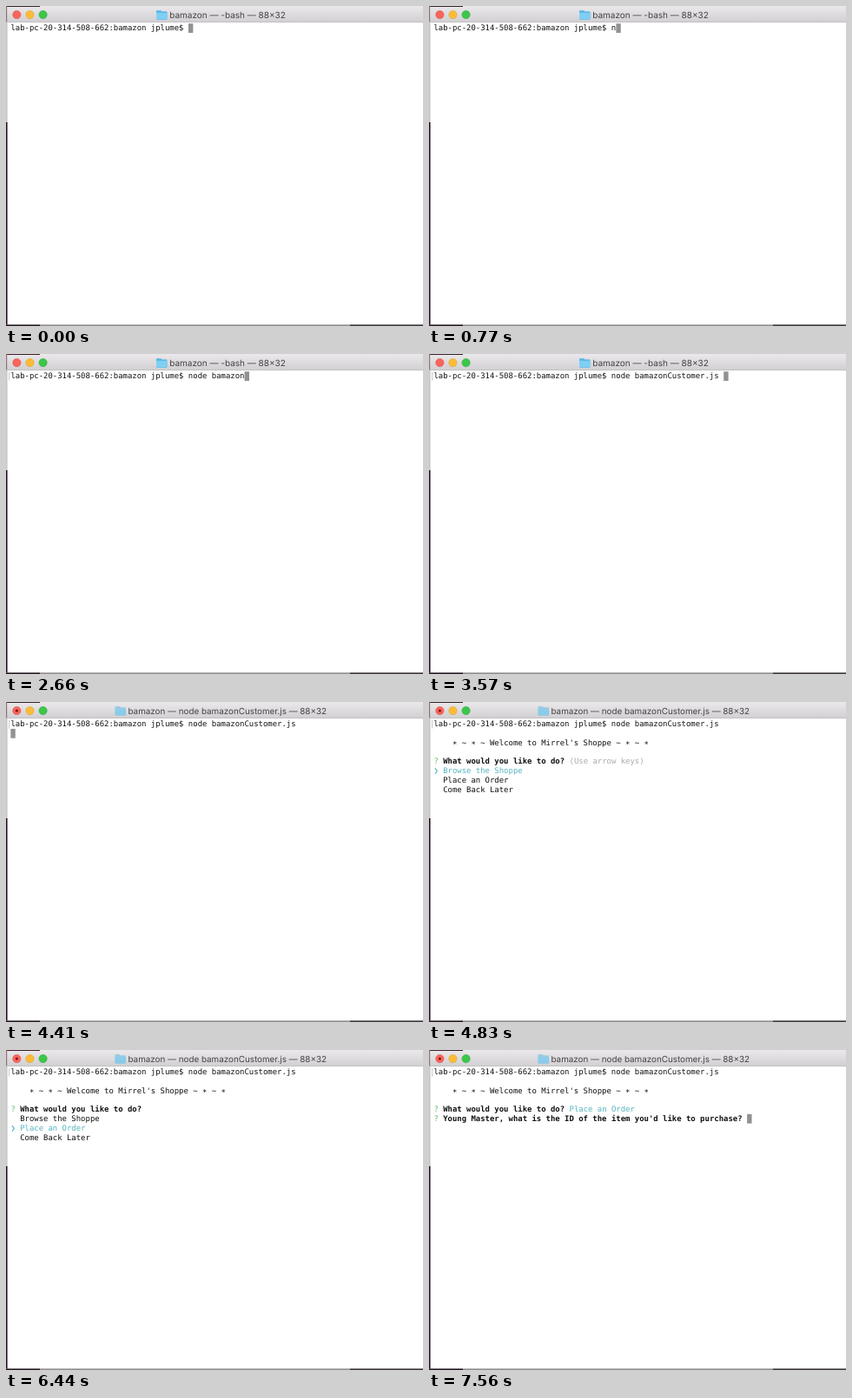
Recreate the animation shown at these times as an HTML page with a canvas. Size 480 px wide and 369 px high, loop 8 s.

```html
<!DOCTYPE html>
<html lang="en">
<head>
<meta charset="utf-8">
<title>Terminal session</title>
<style>
  html, body { margin: 0; width: 100%; height: 100%; overflow: hidden; background: #fff; }
  canvas { display: block; width: 480px; height: 369px; }
</style>
</head>
<body>
<canvas width="480" height="369"></canvas>
<script>
const ctx = document.querySelector('canvas').getContext('2d');
const LOOP = 8000;
const MONO = '"DejaVu Sans Mono", "Liberation Mono", monospace';
const COL = 5.384, ROW = 10.75, LEFT = 5.4, TOP = 20.2;
const BLACK = '#111', CYAN = '#55b5bd', GREEN = '#63bd63', GREY = '#aaa';

const PROMPT = 'lab-pc-20-314-508-662:bamazon jplume$ ';
const COMMAND = 'node bamazonCustomer.js ';
const QUESTION = 'What would you like to do?';
const OPTIONS = ['Browse the Shoppe', 'Place an Order', 'Come Back Later'];

// [time, characters of the command typed so far]
const TYPED = [[0, 0], [770, 1], [910, 2], [980, 3], [1190, 4], [1330, 5], [1680, 6],
  [1890, 7], [1960, 8], [2030, 9], [2660, 12], [3080, 13], [3150, 14], [3290, 15], [3500, 24]];
const COMPLETED = 2660, ENTER = 4270, RETITLE = 4340, MENU = 4830, DOWN = 5880, CHOSEN = 6860;

function rect(x, y, w, h, color) {
  ctx.fillStyle = color;
  ctx.fillRect(x, y, w, h);
}

function disc(x, y, r, color, edge) {
  ctx.beginPath();
  ctx.arc(x, y, r, 0, 7);
  ctx.fillStyle = color;
  ctx.fill();
  if (!edge) return;
  ctx.strokeStyle = edge;
  ctx.lineWidth = 0.6;
  ctx.stroke();
}

function write(col, row, text, color = BLACK, weight = 'normal') {
  ctx.font = `${weight} 8.943px ${MONO}`;
  ctx.fillStyle = color;
  ctx.fillText(text, LEFT + col * COL, TOP + row * ROW + 8.2);
}

function cursor(col, row) {
  rect(LEFT + col * COL, TOP + row * ROW, COL, ROW, '#929292');
}

function folder(x, alpha) {
  ctx.globalAlpha = alpha;
  ctx.beginPath();
  ctx.roundRect(x, 5, 6, 4, 1);
  ctx.roundRect(x, 6.2, 12.5, 9.6, 1);
  ctx.fillStyle = '#5fb9e6';
  ctx.fill();
  rect(x, 8, 12.5, 7, '#7fcff5');
  ctx.globalAlpha = 1;
}

function drawWindow(running) {
  rect(0, 0, 480, 369, '#fff');
  rect(0, 18, 1.6, 116, '#c6c5c7');
  rect(0, 134, 1.6, 235, '#2c1428');

  const bar = ctx.createLinearGradient(0, 1, 0, 18);
  bar.addColorStop(0, '#e9e7e9');
  bar.addColorStop(1, '#d2d0d2');
  rect(0, 0, 480, 18, bar);
  rect(0, 18, 480, 0.8, '#b4b2b4');
  rect(0, 0, 39, 1, '#3a2028');
  rect(0, 0, 1.2, 18, '#8d7478');

  rect(0, 367.4, 480, 1.6, '#8e8b8e');
  rect(0, 367.6, 39, 1.4, '#21141f');
  rect(396, 367.6, 84, 1.4, '#3a343a');

  disc(12.4, 10, 4.6, '#f9655c', '#dc4c44');
  disc(27.5, 10, 4.6, '#fcbc3a', '#dd9f2c');
  disc(42.6, 10, 4.6, '#3cc74b', '#2ba83a');
  if (running) disc(12.4, 10, 1.6, '#7c1510');

  folder(running ? 125.5 : 173, running ? 0.55 : 1);
  ctx.font = `${running ? 9.85 : 10}px Inter, Roboto, sans-serif`;
  ctx.fillStyle = '#454345';
  const job = running ? 'node bamazonCustomer.js' : '-bash';
  ctx.fillText(`bamazon — ${job} — 88×32`, running ? 140.5 : 188.2, 13.7);
}

function drawMenu(t) {
  write(4, 2, "∗ ~ ∗ ~ Welcome to Mirrel's Shoppe ~ ∗ ~ ∗");
  write(0, 4, '?', GREEN);
  write(2, 4, QUESTION, BLACK, 'bold');
  if (t >= CHOSEN) {
    write(29, 4, OPTIONS[1], CYAN);
    write(0, 5, '?', GREEN);
    write(2, 5, "Young Master, what is the ID of the item you'd like to purchase?", BLACK, 'bold');
    cursor(67, 5);
    return;
  }
  if (t < DOWN) write(29, 4, '(Use arrow keys)', GREY);
  const selected = t < DOWN ? 0 : 1;
  OPTIONS.forEach((text, i) => write(2, 5 + i, text, i === selected ? CYAN : BLACK));
  write(0, 5 + selected, '❯', CYAN);
}

function draw(t) {
  ctx.textRendering = 'geometricPrecision';
  drawWindow(t >= RETITLE);

  const typed = TYPED.findLast(([time]) => time <= t)[1];
  if (t >= COMPLETED) rect(3.4, 21, 0.8, 9.5, '#b5b5b5');
  write(0, 0, PROMPT + COMMAND.slice(0, typed));

  if (t < ENTER) cursor(PROMPT.length + typed, 0);
  else if (t < MENU) cursor(0, 1);
  else drawMenu(t);
}

const start = performance.now();
function tick() {
  draw((performance.now() - start) % LOOP);
  requestAnimationFrame(tick);
}
tick();
</script>
</body>
</html>
```
